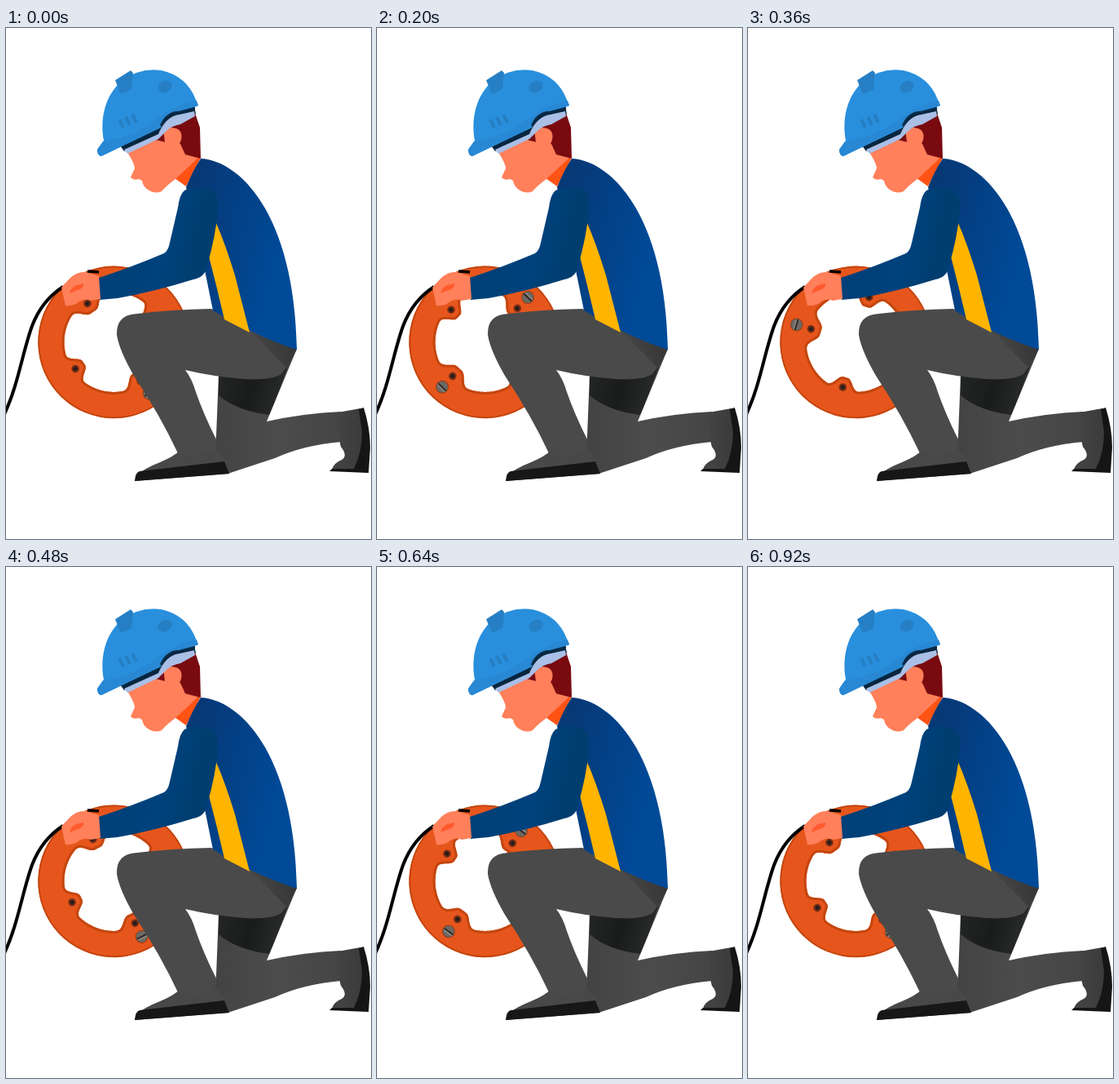
Animation of 448 by 626 pixels, one loop 960 ms. Source, as an HTML page with a canvas:

```html
<!DOCTYPE html>
<html lang="en">
<head>
<meta charset="utf-8">
<style>
html, body { margin: 0; width: 100%; height: 100%; overflow: hidden; background: #fff; }
canvas { display: block; }
</style>
</head>
<body>
<canvas id="stage" width="448" height="626"></canvas>
<script>
const ctx = document.getElementById('stage').getContext('2d');
const LOOP = 960, STEP = 40, TURN_STEPS = 23;
const RAD = Math.PI / 180;
const REEL = { x: 132.5, y: 384.9, outer: 93.3, inner: 61, start: 55.5 };

function fill(path, color) {
  ctx.fillStyle = color;
  ctx.fill(new Path2D(path));
}

function line(path, color, width) {
  ctx.strokeStyle = color;
  ctx.lineWidth = width;
  ctx.stroke(new Path2D(path));
}

function disc(x, y, r, color) {
  ctx.fillStyle = color;
  ctx.beginPath();
  ctx.arc(x, y, r, 0, 2 * Math.PI);
  ctx.fill();
}

function circle(r, color, width) {
  ctx.strokeStyle = color;
  ctx.lineWidth = width;
  ctx.beginPath();
  ctx.arc(0, 0, r, 0, 2 * Math.PI);
  ctx.stroke();
}

function ramp(x0, y0, x1, y1, ...colors) {
  const g = ctx.createLinearGradient(x0, y0, x1, y1);
  colors.forEach((c, i) => g.addColorStop(i / (colors.length - 1), c));
  return g;
}

// Inner edge of the reel: a circle with four lugs, two of them wider.
function holePath() {
  const path = new Path2D();
  for (let a = 0; a < 360; a++) {
    const lug = Math.round(a / 90);
    const width = lug % 2 ? 13 : 16;
    const r = REEL.inner - 16 * Math.exp(-(((a - lug * 90) / width) ** 4));
    path.lineTo(r * Math.cos(a * RAD), r * Math.sin(a * RAD));
  }
  path.closePath();
  return path;
}
const hole = holePath();

function drawReel(angle) {
  ctx.save();
  ctx.translate(REEL.x, REEL.y);
  ctx.rotate(angle * RAD);

  const ring = new Path2D(hole);
  ring.moveTo(REEL.outer, 0);
  ring.arc(0, 0, REEL.outer, 0, 2 * Math.PI);
  ctx.save();
  ctx.clip(ring, 'evenodd');
  disc(0, 0, REEL.outer, '#e6561c');
  ctx.strokeStyle = '#c4460f';
  ctx.lineWidth = 6;
  ctx.stroke(hole);
  circle(REEL.outer, '#c4460f', 4);
  ctx.restore();

  for (let i = 0; i < 4; i++) {
    disc(57.5, 0, 5, '#a83a12');
    disc(57.5, 0, 4, '#5a2a1c');
    disc(57.5, 0, 2, '#211815');
    if (i % 2 === 0) {
      disc(76, 0, 8, '#9a3b16');
      disc(76, 0, 7, '#6c6863');
      line('M76 -6.5V6.5', '#292724', 1.8);
      line('M78 -6V6', '#96918a', 1.2);
    }
    ctx.rotate(Math.PI / 2);
  }
  ctx.restore();
}

function drawHand() {
  line('M-2 473C15 437 20 398 32 365C40 344 53 328 70 317', '#000', 4);
  fill('M68 318L78 307Q87 298 98 299L114 304L116 332L104 334Q97 331 90 335Q84 341 73 340Z', '#ff805a');
  fill('M78 325Q79 319 86 315L95 313Q96 317 91 320Z', '#ff5a2d');
  line('M100 298L114 299', '#000', 3.5);
}

function drawLegs() {
  // rear leg
  fill('M261 425L357 393L320 482Q365 472 411 470L411 507Q365 511 330 527L272 546L256 515L258 500Z',
    ramp(258, 0, 410, 0, '#434343', '#4c4c4c', '#454545'));
  fill('M261 427L347 412Q333 451 323 474Q283 469 261 450Z',
    ramp(262, 430, 340, 450, '#222524', '#191c1b', '#292c2b'));
  fill('M407 471L435 466Q444 500 440 541L400 541Q402 533 412 529Q420 524 411 513L409 505Z',
    ramp(408, 0, 440, 0, '#434343', '#3a3a3a'));
  fill('M433 467L439 465Q447 490 447 514L445 545L397 543L400 540L427 540Q437 520 437 495Z', '#151515');
  // front shoe
  fill('M160 548Q171 539 189 532Q206 525 214 517L259 516L269 530L274 546L158 555Z', '#484848');
  fill('M158 555Q159 544 164 543L268 531L274 546Z', '#171717');
  // front leg
  fill('M252 344L357 393Q350 409 338 424Q325 432 292 430Q254 427 220 419Q228 429 233 446Q242 472 258 504L257 517Q239 527 211 521Q189 474 157 426Q139 395 136 376Q135 351 161 350Q202 345 252 344Z',
    '#4a4a4a');
  fill('M300 371L357 393Q351 406 345 417Z', ramp(310, 400, 350, 390, '#454545', '#383838'));
}

function drawTorso() {
  fill('M239 160C285 162 354 225 357 394Q307 378 254 346L244 297L221 195Q229 175 239 160Z',
    ramp(225, 230, 340, 260, '#073976', '#034187', '#004a98'));
  fill('M258 239Q269 264 281 303L299 373L268 357Q259 318 249 280Z', '#ffb400');
  fill('M219 199Q230 193 247 197Q262 200 260 221Q258 254 246 294Q244 305 230 308Q182 323 137 331L115 333Q108 320 114 306Q154 293 194 276Q199 273 201 263L211 220Q213 204 219 199Z',
    ramp(150, 285, 225, 300, '#004078', '#00427d', '#003e70'));
}

function drawHead() {
  fill('M239 159L221 194L207 184L226 157Z', '#ff5314');
  fill('M147 149L188 126L213 125L236 159L208 185Q197 193 191 200Q183 204 174 198Q168 194 167 187L163 185Q156 187 153 183L158 172Q158 166 147 149Z', '#ff805a');
  fill('M184 137L189 122L232 104L238 122L239 160L220 155L214 142L196 140Z', '#790b10');
  fill('M194 132Q192 123 203 122Q218 123 215 137Q212 148 203 146L195 140Z', '#ff805a');
  // helmet straps
  fill('M140 144L188 121Q196 101 214 100L231 96L233 105L210 112L190 131L145 151Z', '#08263f');
  fill('M145 149L187 130Q196 108 213 106L231 102L232 108L214 118Q203 120 197 126L187 136L149 154Z', '#a9bfe6');
  // helmet shell
  fill('M120 138C115 110 122 82 142 65Q164 48 191 52Q222 59 233 88L236 95L217 102Q199 99 190 122L117 157Q112 156 112 149Z', '#298fdd');
  fill('M119 139Q162 132 190 108Q211 93 234 89L236 95L217 102Q199 99 190 122L117 157Q112 156 112 149Z', '#2888d4');
  fill('M134 64L153 52L156 55L154 75L141 81Z', '#267fc4');
  ctx.fillStyle = '#267fc4';
  ctx.beginPath();
  ctx.ellipse(195, 72, 9, 7, -25 * RAD, 0, 2 * Math.PI);
  ctx.fill();
  for (let i = 0; i < 3; i++) {
    const x = 139 + i * 8, y = 112 - i * 3;
    line(`M${x} ${y}l5 10`, '#267ec3', 4);
  }
  line('M190 120Q197 103 213 103L232 98', '#0a2a47', 2.5);
}

let shown = -1;
function frame(elapsed) {
  const step = Math.floor((Math.max(0, elapsed) % LOOP) / STEP);
  if (step !== shown) {
    shown = step;
    ctx.fillStyle = '#fff';
    ctx.fillRect(0, 0, 448, 626);
    drawReel(REEL.start + step * 360 / TURN_STEPS);
    drawLegs();
    drawHead();
    drawTorso();
    drawHand();
  }
  requestAnimationFrame(t => frame(t - begin));
}

const begin = performance.now();
frame(0);
</script>
</body>
</html>
```
